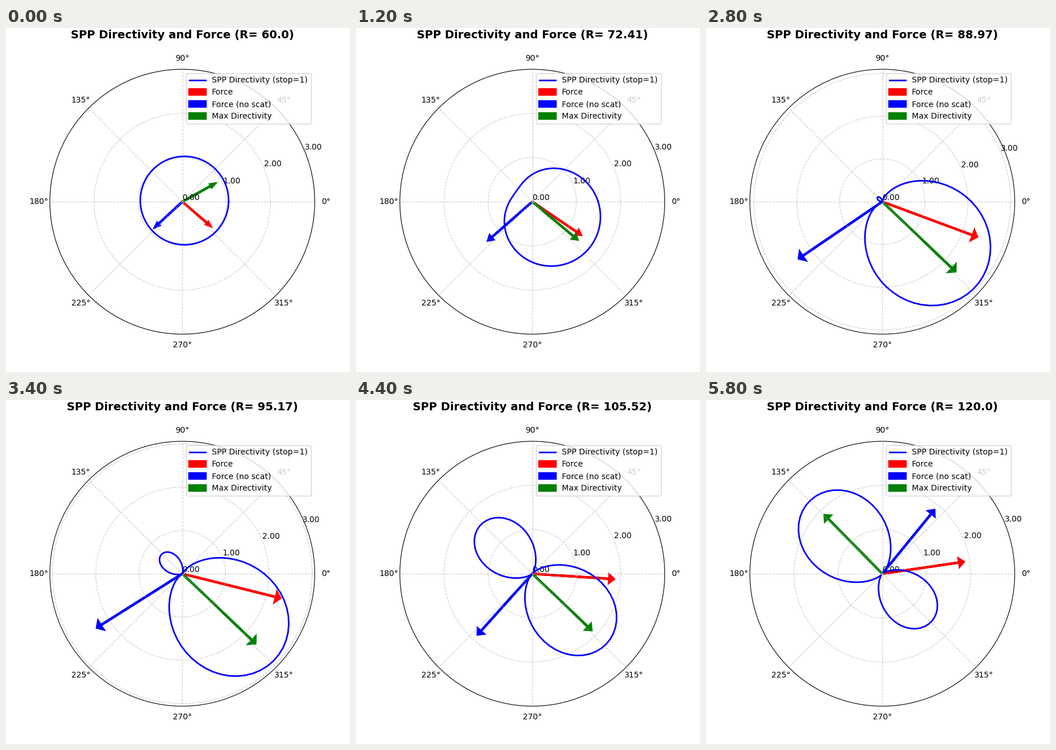
Write a matplotlib script that moves like this. It is 600x600 px and loops after 6000 ms.

```python
import numpy as np
import matplotlib.pyplot as plt
from matplotlib.animation import FuncAnimation

FRAMES, INTERVAL = 30, 200
THETA = np.linspace(0, 2 * np.pi, 100)
RADII = np.linspace(60, 120, FRAMES)


def directivity(i):
    """Monopole and dipole in interference, normalised to a mean of 1."""
    axis = np.radians(-42.2 - 2.7 * (i / (FRAMES - 1)) ** 3)
    mono = 1.82 * (24.7 - i) / (i + 0.5) ** 1.28
    loss = 0.005 * i
    skew = 0.052 * np.exp(-(i / 12) ** 4)
    d = THETA - axis
    power = (mono + np.cos(d)) ** 2 + loss**2
    r = power / (mono**2 + loss**2 + 0.5) + skew * np.sin(d)
    return np.maximum(r, 0)


def force_angle(i):
    """Steady turn with a slight sway."""
    s = i / (FRAMES - 1)
    sway = 3.1 * np.sin(np.pi * s) + 1.9 * np.sin(2 * np.pi * s)
    return np.radians(-40.7 + 49 * s - sway)


def free_angle(i):
    """Slow drift back, then a quick swing through the resonance."""
    swing = 360 / (1 + np.exp((27.67 - i) / 2.34))
    return np.radians(223 - 0.05 * i**2 + swing)


fig = plt.figure(figsize=(6, 6), dpi=100)
ax = fig.add_subplot(projection="polar")


def arrow(angle, length, color, label):
    ax.arrow(angle, 0, 0, length, head_width=0.1, head_length=0.1,
             length_includes_head=True, fc=color, ec=color, lw=3, label=label)


def draw(i):
    ax.clear()
    r = directivity(i)
    peak = r.max()
    size = 0.8 * peak

    ax.plot(THETA, r, color="blue", lw=2, label="SPP Directivity (stop=1)")
    arrow(force_angle(i), size, "red", "Force")
    arrow(free_angle(i), size, "blue", "Force (no scat)")
    arrow(THETA[r.argmax()], size, "green", "Max Directivity")

    ticks = range(4)
    ax.set_yticks(ticks, [f"{t:.2f}" for t in ticks])
    ax.set_ylim(0, max(3, 1.05 * peak))
    ax.grid(True, linestyle="--", alpha=0.65)
    ax.set_title(f"SPP Directivity and Force (R= {round(float(RADII[i]), 2)})",
                 fontsize=14, fontweight="bold", pad=20)
    ax.legend(loc="upper right")
    return []


anim = FuncAnimation(fig, draw, frames=FRAMES, interval=INTERVAL,
                     repeat=True, repeat_delay=0)
plt.show()
```
